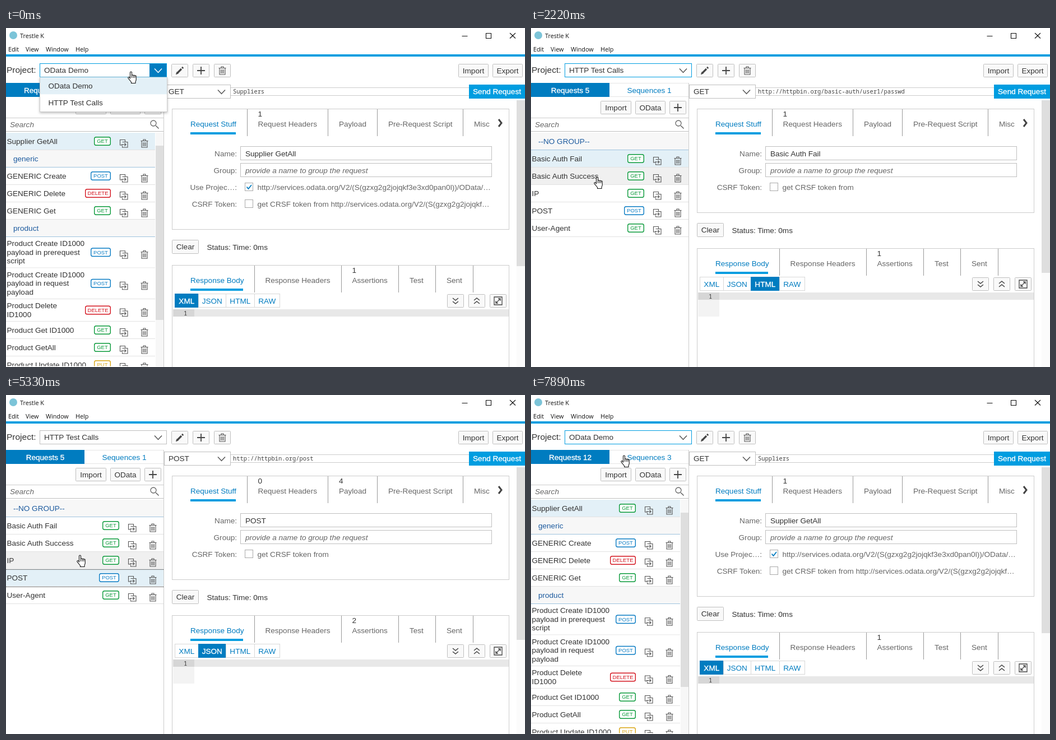
These frames come from a looping animation (926 px wide and 605 px high, 8 s). An HTML page:

```html
<!DOCTYPE html>
<html lang="en">
<head>
<meta charset="utf-8">
<title>Request client</title>
<style>
html, body { margin: 0; width: 100%; height: 100%; overflow: hidden; background: #fff; }
svg { display: block; }
text { font: 13.56px "Liberation Sans", Arial, sans-serif; white-space: pre; }
.chrome { font: 10.8px "Open Sans", "Noto Sans", sans-serif; }
.mono { font: 10.4px "Noto Sans Mono", "DejaVu Sans Mono", monospace; }
.big { font-size: 15.5px; }
.hint { font-style: italic; }
.badge { font-size: 9.5px; }
.strong { stroke: #fff; stroke-width: .35px; }
.mid { text-anchor: middle; }
.end { text-anchor: end; }
</style>
</head>
<body>
<svg id="stage" width="926" height="605" viewBox="0 0 926 605"></svg>
<script>
const LOOP = 8000;
const BLUE = '#007cc0', SKY = '#009de0', EDGE = '#bfbfbf', INK = '#333', SOFT = '#666';
const PICKED = '#e3f0f7', HOVER = '#f0f0f0', THUMB = '#dedede';

const text = (x, y, s, fill = INK, cls = '') =>
  `<text x="${x}" y="${y}" fill="${fill}" class="${cls}">${s}</text>`;
const fill = (x0, y0, x1, y1, color) =>
  `<rect x="${x0}" y="${y0}" width="${x1 - x0}" height="${y1 - y0}" fill="${color}"/>`;
const box = (x0, y0, x1, y1, bg = '#fff', stroke = EDGE, r = 0) =>
  `<rect x="${x0 + .5}" y="${y0 + .5}" width="${x1 - x0 - 1}" height="${y1 - y0 - 1}" rx="${r}" fill="${bg}" stroke="${stroke}"/>`;
const path = (d, stroke = '#555', w = 1.3, bg = 'none', more = '') =>
  `<path d="${d}" stroke="${stroke}" stroke-width="${w}" fill="${bg}" ${more}/>`;
const at = (x, y, s) => `<g transform="translate(${x} ${y})">${s}</g>`;
const hline = (x0, x1, y, color) => fill(x0, y, x1, y + 1, color);
const vline = (x, y0, y1, color) => fill(x, y0, x + 1, y1, color);
const button = (x0, y0, x1, y1, label) =>
  box(x0, y0, x1, y1, '#f9f9f9', EDGE, 1) + text((x0 + x1) / 2, y0 + 16.5, label, INK, 'mid');
const iconButton = (x0, y0, icon) => box(x0, y0, x0 + 30, y0 + 24, '#f9f9f9', EDGE, 1) + at(x0 + 15, y0 + 12, icon);

const chevron = color => path('M-6.5-3.5L0 3.5L6.5-3.5', color, 1.5);
const icons = {
  pencil: path('M-6.5 6.5L-5 2.5L-2.5 5Z', '#444', 1, '#444') + path('M-3.8 3.8L3 -3M4.2-4.2L6-6', '#444', 3.2),
  plus: path('M-7 0H7M0-7V7', '#444', 1.8),
  trash: path('M-6.5-4.5H6.5M-2-5V-7H2V-5M-5-4.5V7H5V-4.5M-2.3-2V5M0-2V5M2.3-2V5', '#555', 1.1),
  copy: path('M-2 3H-6.5V-6.5H2.5V-3M-2.5-2.5H7V7H-2.5V4.5M-4 2H4M1.5-.5L4 2L1.5 4.5', '#555', 1.1),
  find: path('M2.2 2.2L7.5 7.5', SOFT, 1.6) + '<circle cx="-2" cy="-2" r="5" fill="none" stroke="#666" stroke-width="1.3"/>',
  down: path('M-5-5L0-1L5-5M-5 1L0 5L5 1', '#444', 1.5),
  up: path('M-5-1L0-5L5-1M-5 5L0 1L5 5', '#444', 1.5),
  expand: path('M-7-7H7V7H-7ZM-4 4L4-4M0-4H4V0M-4 0V4H0', '#444', 1.3)
};

const projects = {
  odata: {
    title: 'OData Demo', tabs: ['Requests 12', 'Sequences 3'], width: 266,
    rows: [
      ['Supplier GetAll', 'GET'], ['generic'], ['GENERIC Create', 'POST'], ['GENERIC Delete', 'DELETE'],
      ['GENERIC Get', 'GET'], ['product'], ['Product Create ID1000|payload in prerequest|script', 'POST'],
      ['Product Create ID1000|payload in request|payload', 'POST'], ['Product Delete|ID1000', 'DELETE'],
      ['Product Get ID1000', 'GET'], ['Product GetAll', 'GET'], ['Product Update ID1000', 'PUT']
    ]
  },
  http: {
    title: 'HTTP Test Calls', tabs: ['Requests 5', 'Sequences 1'], width: 281,
    rows: [
      ['--NO GROUP--'], ['Basic Auth Fail', 'GET'], ['Basic Auth Success', 'GET'],
      ['IP', 'GET'], ['POST', 'POST'], ['User-Agent', 'GET']
    ]
  }
};
const BADGE = { GET: ['#0a9a3a', 30], POST: ['#0a7cc4', 36], DELETE: ['#d4141f', 46], PUT: ['#d9a616', 30] };
const HOST = 'http://services.odata.org/V2/(S(gzxg2g2jojqkf';
const AUTH = 'http://httpbin.org/basic-auth/user1/passwd';
const request = (name, url, method, headers, payload, asserts, format) =>
  ({ name, url, method, headers, payload, asserts, format });
const requests = {
  supplier: request('Supplier GetAll', 'Suppliers', 'GET', 1, '', 1, 'XML'),
  fail: request('Basic Auth Fail', AUTH, 'GET', 1, '', 1, 'HTML'),
  success: request('Basic Auth Success', AUTH, 'GET', 1, '', 1, 'HTML'),
  ip: request('IP', 'http://httpbin.org/ip', 'GET', 0, '', 2, 'JSON'),
  post: request('POST', 'http://httpbin.org/post', 'POST', 0, 4, 2, 'JSON')
};

// Each step changes only the listed parts of the state.
const steps = [
  [0, { combo: 'odata', list: 'odata', empty: false, req: 'supplier', tall: true, sel: 0, hover: -1, focus: -1,
    lit: true, arrow: 'open', menu: { sel: 0 }, at: [217, 77], press: false }],
  [270, { at: [200, 110] }],
  [400, { at: [180, 137], menu: { sel: 0, hover: 1 } }],
  [550, { at: [180, 139] }],
  [1110, { combo: 'http', req: 'fail', empty: true, arrow: '', menu: { active: 1, alpha: .65 } }],
  [1240, { menu: null, list: 'http', empty: false, sel: 1 }],
  [1360, { tall: false }],
  [1820, { at: [165, 168] }],
  [1950, { at: [130, 217], hover: 1 }],
  [2070, { at: [112, 247] }],
  [2220, { at: [112, 265], hover: 2 }],
  [2630, { press: true, focus: 2, lit: false }],
  [2780, { press: false, sel: 2, req: 'success' }],
  [3060, { at: [115, 291], hover: 3 }],
  [3200, { at: [119, 297] }],
  [3730, { press: true, focus: 3 }],
  [3860, { press: false, sel: 3, req: 'ip' }],
  [3980, { at: [118, 312], hover: 4 }],
  [4130, { at: [118, 334] }],
  [4690, { press: true, focus: 4 }],
  [4840, { press: false, sel: 4 }],
  [4960, { req: 'post' }],
  [5210, { at: [122, 308], hover: 3 }],
  [5330, { at: [126, 285] }],
  [5470, { at: [138, 215], hover: -1 }],
  [5590, { at: [150, 140] }],
  [5740, { at: [165, 104] }],
  [5870, { at: [176, 79], lit: true, arrow: 'hover' }],
  [6020, { at: [176, 76] }],
  [6140, { press: true }],
  [6290, { press: false, focus: -1, arrow: 'open', menu: { sel: 1 } }],
  [6760, { at: [168, 94], menu: { sel: 1, hover: 0 } }],
  [6880, { at: [160, 108] }],
  [7040, { at: [160, 107] }],
  [7500, { press: true }],
  [7650, { press: false, combo: 'odata', req: 'supplier', tall: true, empty: true, arrow: '', menu: { active: 0, alpha: .65 } }],
  [7770, { menu: null, list: 'odata', empty: false, sel: 0 }],
  [7890, { hover: -1 }]
];

function windowBar() {
  return '<circle cx="13" cy="13" r="7" fill="#7cc4d8"/>' + text(25, 18, 'Trestle K', '#111', 'chrome') +
    path('M813.5 14.5H823.5M856.5 9.5H865.5V18.5H856.5ZM899 9L909 18.5M909 9L899 18.5', '#111', 1.1) +
    [[4, 'Edit'], [35, 'View'], [71, 'Window'], [124, 'Help']].map(([x, s]) => text(x, 41.5, s, '#111', 'chrome')).join('') +
    fill(0, 47, 926, 51, SKY);
}

function toolbar(s) {
  const open = s.arrow === 'open';
  return text(1, 80, 'Project:', INK, 'big') +
    box(60, 63, 287, 88, '#fff', s.lit ? SKY : EDGE) +
    (s.arrow ? fill(256, 64, 286, 87, open ? BLUE : '#ebebeb') : '') +
    at(271.5, 76, chevron(open ? '#fff' : '#555')) +
    text(68, 80, projects[s.combo].title) +
    iconButton(295, 64, icons.pencil) + iconButton(333, 64, icons.plus) + iconButton(371, 64, icons.trash) +
    button(807, 64, 861, 88, 'Import') + button(868, 64, 922, 88, 'Export');
}

function row([label, method], i, y, h, s, width) {
  const c = y + h / 2 - .5;
  if (!method) return fill(0, y, width, y + h, '#f7f7f7') + hline(0, width, y + h - 1, '#9fc3de') + text(13, c + 4.5, label, '#1c5a9e');
  const bg = i === s.sel ? PICKED : i === s.hover ? HOVER : '#fff';
  const lines = label.split('|');
  const [color, w] = BADGE[method];
  const right = width === 266 ? 187 : 202;
  return fill(0, y, width, y + h, bg) + hline(0, width, y + h - 1, '#e2e2e2') +
    lines.map((l, n) => text(1.5, c + 4.5 + (n - (lines.length - 1) / 2) * 15.3, l)).join('') +
    `<rect x="${right - w + .7}" y="${c - 7.3}" width="${w - 1.4}" height="14.6" rx="3" fill="#fff" stroke="${color}" stroke-width="1.4"/>` +
    text(right - w / 2, c + 3.4, method, color, 'badge mid') +
    at(right + 23, c + 4, icons.copy) + at(right + 60, c + 4, icons.trash);
}

function sidebar(s) {
  const p = projects[s.list];
  let out = fill(0, 98, 140, 123, BLUE) + hline(140, 281, 98, '#e5e5e5') + hline(140, 281, 122, '#e5e5e5') +
    text(70, 115.5, p.tabs[0], '#fff', 'mid strong') + text(211, 115.5, p.tabs[1], BLUE, 'mid') +
    button(124, 130, 179, 154, 'Import') + button(186, 130, 240, 154, 'OData') + iconButton(247, 130, icons.plus) +
    hline(0, 281, 160, '#ccc') + hline(0, 281, 184, EDGE) +
    text(7, 177, 'Search', SOFT, 'hint') + at(265, 172, icons.find);
  if (!s.empty) {
    let y = 187, ring = '';
    const rows = p.rows.map((r, i) => {
      const h = [31, 40, 55.5][r[0].split('|').length - 1];
      const part = row(r, i, y, h, s, p.width);
      if (i === s.focus) ring = path(`M0 ${y + .5}H281M0 ${y + h + .5}H281`, '#222', 1, 'none', 'stroke-dasharray="1 1"');
      y += h;
      return part;
    });
    out += `<g clip-path="url(#listClip)">${rows.join('')}${ring}</g>`;
    if (s.list === 'odata') out += fill(267, 187, 281, 604, '#f7f7f7') + fill(267, 210, 281, 521, THUMB);
  }
  return out + vline(281, 98, 605, '#ccc');
}

const tabs = (y, marks, items) => items.map(([x, label, count = ''], i) =>
  text(x, y, label, i ? SOFT : BLUE) + text(x, y - 18, count, INK)).join('') +
  marks.map(x => vline(x, y - 31, y + 17, '#999')).join('');

const checkbox = (y, on) => box(426, y, 441, y + 15, '#fff', '#aaa') +
  (on ? path(`M429.5 ${y + 7.5}L432.5 ${y + 11}L438 ${y + 4}`, BLUE, 1.8) : '');

function requestPanel(s, r) {
  const low = s.tall ? 0 : -30;
  const own = s.req === 'supplier';
  const input = (y, label, value, cls) => text(412, y + 17.5, label + ':', SOFT, 'end') +
    box(418, y, 867, y + 25) + text(427, y + 17.5, value, cls ? SOFT : INK, cls);
  return box(282, 101, 401, 126) + text(290, 118, r.method) + at(384.5, 114, chevron('#555')) +
    hline(401, 826, 106, '#ccc') + hline(401, 826, 120, '#ccc') + text(405, 117, r.url, '#444', 'mono') +
    fill(826, 101, 926, 126, SKY) + text(876, 118, 'Send Request', '#fff', 'mid strong') +
    fill(911, 129, 926, 605, '#fbfbfb') + fill(911, 129, 926, s.tall ? 425 : 437, THUMB) +
    box(296, 144, 898, 360 + low, '#fff', '#ccc') +
    tabs(176, [430, 574, 662, 815], [[329, 'Request Stuff'], [449.5, 'Request Headers', r.headers],
      [594, 'Payload', r.payload], [682, 'Pre-Request Script'], [835, 'Misc']]) +
    fill(329, 186, 410, 190, SKY) + path('M879 163L884 169.5L879 176', '#444', 3) +
    input(211, 'Name', r.name, '') + input(241, 'Group', 'provide a name to group the request', 'hint') +
    (s.tall ? text(412, 288.5, 'Use Projec…:', SOFT, 'end') + checkbox(276, own) +
      text(448.5, 288.5, own ? HOST + '3e3xd0pan0l))/OData/…' : '', SOFT) : '') +
    text(412, 318.5 + low, 'CSRF Token:', SOFT, 'end') + checkbox(306 + low, false) +
    text(448.5, 318.5 + low, 'get CRSF token from ' + (own ? HOST + '…' : ''), SOFT);
}

function responsePanel(s, r) {
  const cells = [[301, 343, 'XML'], [343, 392, 'JSON'], [392, 443, 'HTML'], [443, 488, 'RAW']];
  return at(0, s.tall ? 0 : -30,
    button(296, 378, 344, 403, 'Clear') + text(358.5, 395.5, 'Status: Time: 0ms') +
    box(296, 423, 898, 700, '#fff', '#ccc') +
    tabs(455, [443, 598, 700, 766, 833], [[329, 'Response Body'], [462.5, 'Response Headers'],
      [617.5, 'Assertions', r.asserts], [720, 'Test'], [786, 'Sent']]) +
    fill(329, 465, 423, 469, SKY) +
    cells.map(([a, b, label]) => {
      const on = label === r.format;
      return box(a, 474, b + 1, 499, on ? BLUE : '#fff', on ? BLUE : '#d8d8d8') +
        text((a + b) / 2 + .3, 491.5, label, on ? '#fff' : BLUE, on ? 'mid strong' : 'mid');
    }).join('') +
    iconButton(787, 475, icons.down) + iconButton(825, 475, icons.up) + iconButton(863, 475, icons.expand) +
    (s.tall ? '' : fill(298, 515, 336, 545, '#f3f3f3')) +
    fill(298, 502, 336, 515, '#d6d6d6') + fill(336, 502, 897, 515, '#e8e8e8') +
    text(320, 512.5, '1', INK, 'mono mid'));
}

function menu(m) {
  if (!m) return '';
  const items = [projects.odata.title, projects.http.title].map((label, i) => {
    const on = i === m.active, y = 88 + i * 30.5;
    const bg = on ? BLUE : i === m.sel ? PICKED : i === m.hover ? HOVER : '#fff';
    return fill(61, y, 287, y + 30.5, bg) + text(75.5, 108 + i * 30, label, on ? '#fff' : INK, on ? 'strong' : '');
  });
  return `<g opacity="${m.alpha || 1}"><rect x="60.5" y="88" width="227" height="61.5" fill="#fff" stroke="#ccc" filter="url(#shade)"/>${items.join('')}</g>`;
}

function pointer(s) {
  const ring = s.press ? '<circle cx="6" cy="2" r="9.3" fill="none" stroke="#222" stroke-width="1.2"/>' : '';
  return at(...s.at, ring +
    path('M4.5 13V2.5a1.5 1.5 0 0 1 3 0V8a1.4 1.4 0 0 1 2.8 .3a1.3 1.3 0 0 1 2.6 .5a1.2 1.2 0 0 1 2.3 .9V15q0 2-1.2 3.5V21.5H6.5V19.5L1.2 12.8a1.3 1.3 0 0 1 2-1.8Z',
      '#111', 1.1, '#fff', 'stroke-linejoin="round"') +
    path('M7.5 8v4M10.3 8.5v3.5M12.9 9v3', '#111', 1));
}

const DEFS = '<defs><clipPath id="listClip"><rect y="185" width="281" height="418.5"/></clipPath>' +
  '<filter id="shade" x="-10%" y="-20%" width="120%" height="150%"><feDropShadow dx="0" dy="2" stdDeviation="2" flood-opacity=".25"/></filter></defs>';

function draw(s) {
  const r = requests[s.req];
  return DEFS + fill(0, 0, 926, 605, '#fff') + windowBar() + toolbar(s) + sidebar(s) +
    requestPanel(s, r) + responsePanel(s, r) + menu(s.menu) + pointer(s);
}

const stage = document.getElementById('stage');
const start = performance.now();
let shown = 0;
function tick() {
  const t = (performance.now() - start) % LOOP;
  const past = steps.filter(([time]) => time <= t);
  if (past.length !== shown) {
    shown = past.length;
    stage.innerHTML = draw(Object.assign({}, ...past.map(step => step[1])));
  }
  requestAnimationFrame(tick);
}
tick();
</script>
</body>
</html>
```
